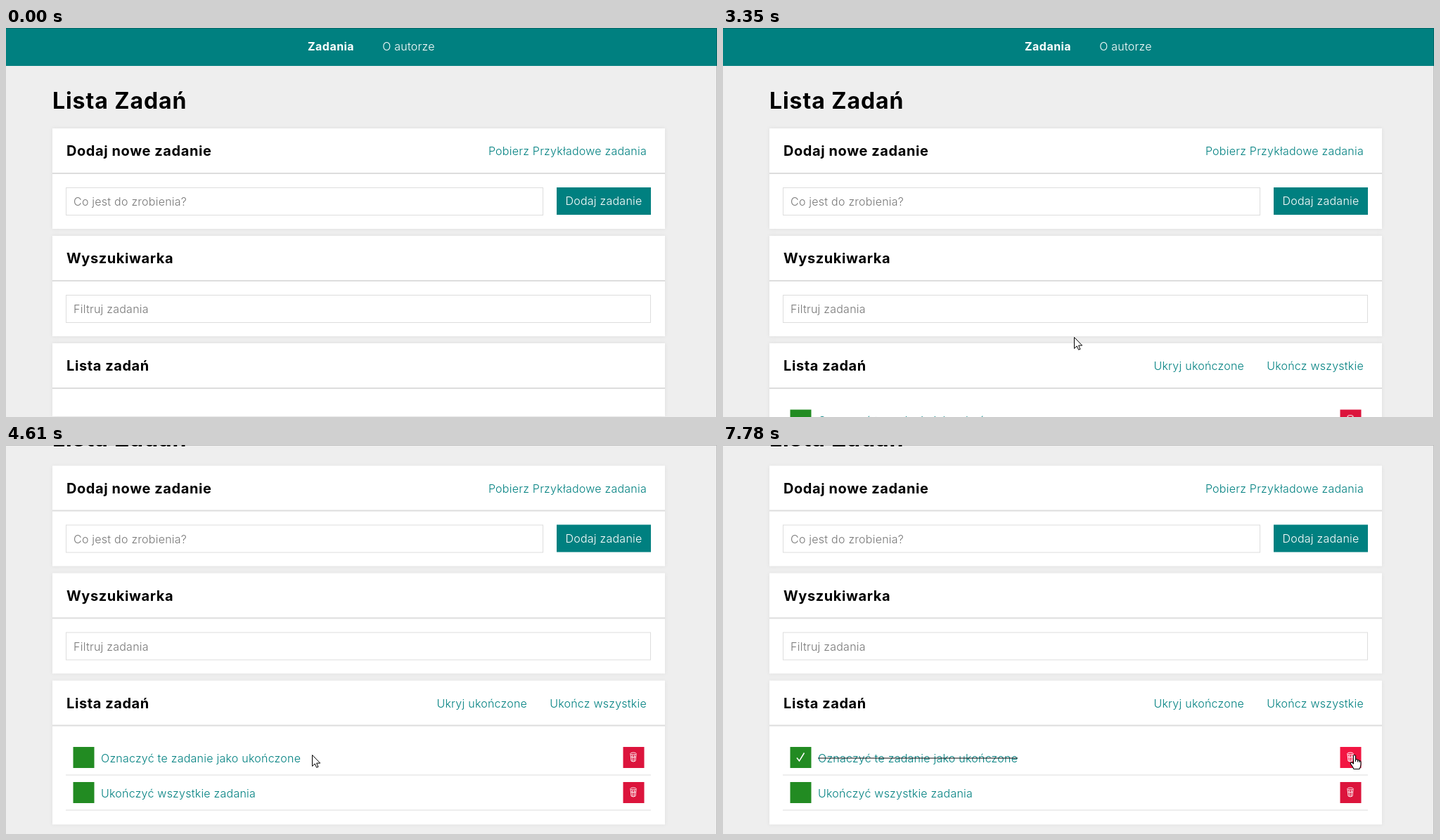
Recreate the animation shown at these times as an HTML page. Size 1011 by 554 pixels, loop 8 s.

```html
<!DOCTYPE html>
<html lang="pl">
<head>
<meta charset="utf-8">
<title>Lista zadań</title>
<style>
  * { box-sizing: border-box; }
  html, body { margin: 0; width: 100%; height: 100%; overflow: hidden; background: #eee; }
  body {
    position: relative;
    font: 350 16px/36px Inter, "Open Sans", sans-serif;
    font-optical-sizing: none;
    letter-spacing: .015em;
    white-space: nowrap;
    cursor: default;
  }
  #page { position: absolute; left: 0; top: 0; width: 1011px; }
  nav { display: flex; gap: 40px; height: 54px; padding: 8px 0 0 429px; background: teal; color: #fff; }
  h1, h2, b { margin: 0; font-weight: 700; letter-spacing: .029em; }
  h1 { margin: 30px 66px 19px; font-size: 32px; line-height: 40px; }
  h2 { margin-right: auto; font-size: 20px; }
  section { margin: 0 74px 10px 66px; background: #fff; box-shadow: 0 0 5px #ddd; }
  header { display: flex; gap: 32px; align-items: center; height: 65px; padding: 0 26px 0 20px; border-bottom: 2px solid #ddd; }
  .content { display: flex; gap: 19px; padding: 19px 20px 19px 19px; }
  .field { flex: 1; height: 40px; padding-left: 10px; border: 1px solid #ddd; line-height: 38px; color: #777; }
  .add { width: 134px; height: 39px; background: teal; color: #fff; text-align: center; line-height: 39px; }
  .link { color: teal; }
  #list { padding: 20px 20px 19px 19px; }
  #rows { padding-bottom: 1px; }
  .row { display: flex; align-items: center; height: 50px; padding: 0 9px 0 11px; border-bottom: 1px solid #ddd; }
  .row .link { margin: 0 auto 0 9px; line-height: 20px; }
  .box { width: 30px; height: 30px; transform: translate(-.5px, -.5px); }
  .box svg { display: block; width: 30px; height: 30px; fill: none; stroke: #fff; }
  .check { background: forestgreen; }
  .trash { background: crimson; }
  .check svg { visibility: hidden; stroke-width: 1.5; }
  .done .check svg { visibility: visible; }
  .done .link { text-decoration: line-through 1px #111; }
  .hover { filter: brightness(1.1); }
  .pressed .hover { filter: brightness(1.2); }
  #frame { position: absolute; inset: 0; border: solid rgba(0, 0, 0, .2); border-width: 1px 1px 0 0; }
  .cursor { position: absolute; left: 0; top: 0; overflow: visible; fill: #fff; stroke: #000; stroke-linejoin: round; }
</style>
</head>
<body>
<div id="page">
  <nav><b>Zadania</b><span>O autorze</span></nav>
  <h1>Lista Zadań</h1>

  <section>
    <header><h2>Dodaj nowe zadanie</h2><span class="link hot">Pobierz Przykładowe zadania</span></header>
    <div class="content"><div class="field">Co jest do zrobienia?</div><div class="add">Dodaj zadanie</div></div>
  </section>

  <section>
    <header><h2>Wyszukiwarka</h2></header>
    <div class="content"><div class="field">Filtruj zadania</div></div>
  </section>

  <section>
    <header>
      <h2>Lista zadań</h2>
      <span class="link hot late">Ukryj ukończone</span>
      <span class="link hot late">Ukończ wszystkie</span>
    </header>
    <div id="list"><div id="rows" class="late"></div></div>
  </section>
</div>
<div id="frame"></div>

<svg class="cursor" id="arrow" width="20" height="22">
  <path d="M.5.5V16.500L4.200 13 6.700 18.300 9 17.300 6.600 12.100H11.700Z"/>
</svg>
<svg class="cursor" id="hand" width="20" height="22">
  <path d="M-1.500 2Q-1.500.5 0 .5T1.500 2V7Q4 6 4.500 8 6.500 7.300 7 9 9 8.500 9 10.500V14Q9 17 7 20.500H-1Q-2.500 17-5 14-6.500 11.500-5 11-3.500 10.500-1.500 13ZM1.500 7V10M4.500 8V10.500M7 9V11" stroke-width="1.100"/>
</svg>

<script>
  const LOOP = 8000, TICK = 68;
  const $ = id => document.getElementById(id);

  const tick = '<path d="M9.500 15.500 13 20 20 8.500"/>';
  const bin = `<g stroke-width=".9"><ellipse cx="14.500" cy="9.500" rx="4.200" ry="1.500"/>
    <path d="M10.500 10 11.500 20Q14.500 22 17.500 20L18.500 10M13 11.500 13.400 20.500M16 11.500 15.600 20.500M11 14Q14.500 15.500 18 14"/></g>`;
  const box = (kind, icon) => `<div class="box hot ${kind}"><svg>${icon}</svg></div>`;
  $("rows").innerHTML = ["Oznaczyć te zadanie jako ukończone", "Ukończyć wszystkie zadania"]
    .map(text => `<div class="row">${box("check", tick)}<span class="link hot">${text}</span>${box("trash", bin)}</div>`)
    .join("");

  const hot = [...document.querySelectorAll(".hot")];
  const late = document.querySelectorAll(".late");
  const firstRow = document.querySelector(".row");

  // Each move carries the cursor on from where the last one ended
  const entry = { x: 919, y: 530 };
  const moves = [
    { from: 790, to: 1470, x: 700, y: 203 },
    { from: 1500, to: 1810, x: 702, y: 166 },
    { from: 2140, to: 2270, x: 693, y: 161 },
    { from: 3080, to: 3350, x: 499, y: 440 },
    { from: 4540, to: 5500, x: 109, y: 446 },
    { from: 6360, to: 6700, x: 492, y: 455 },
    { from: 6960, to: 7170, x: 872, y: 386 },
    { from: 7360, to: 7780, x: 898, y: 441 }
  ];

  const easeOut = u => 1 - (1 - u) ** 2.4;

  // Progress advances in whole ticks, as in a screen recording
  function progress(t, { from, to }) {
    const steps = Math.round((to - from) / TICK);
    const u = Math.min(1, (t - from) / (to - from));
    return easeOut(Math.floor(u * steps + .01) / steps);
  }

  function cursorAt(t) {
    let { x, y } = entry;
    for (const move of moves) {
      if (t < move.from) break;
      const u = progress(t, move);
      x += (move.x - x) * u;
      y += (move.y - y) * u;
    }
    return { x: Math.round(x), y: Math.round(y) };
  }

  function isOver(el, { x, y }) {
    const r = el.getBoundingClientRect();
    return x >= r.left && x < r.right && y >= r.top && y < r.bottom;
  }

  const within = (t, from, to) => t >= from && t < to;

  function draw(t) {
    const scroll = t < 3750 ? 0 : t < 3820 ? 81 : 113.5;
    $("page").style.transform = `translateY(${-scroll}px)`;
    $("page").className = within(t, 2140, 2270) || within(t, 5690, 5820) ? "pressed" : "";
    late.forEach(el => el.style.display = t < 2550 ? "none" : "");
    firstRow.classList.toggle("done", t >= 5820);

    const visible = t >= moves[0].from;
    const pos = cursorAt(t);
    const target = visible && hot.find(el => isOver(el, pos));
    hot.forEach(el => el.classList.toggle("hover", el === target));
    for (const id of ["arrow", "hand"]) {
      const style = $(id).style;
      style.visibility = visible && (id === "hand") === !!target ? "visible" : "hidden";
      style.transform = `translate(${pos.x}px, ${pos.y}px)`;
    }
  }

  const origin = performance.now();
  function run() {
    draw((performance.now() - origin) % LOOP);
    requestAnimationFrame(run);
  }
  run();
</script>
</body>
</html>
```
